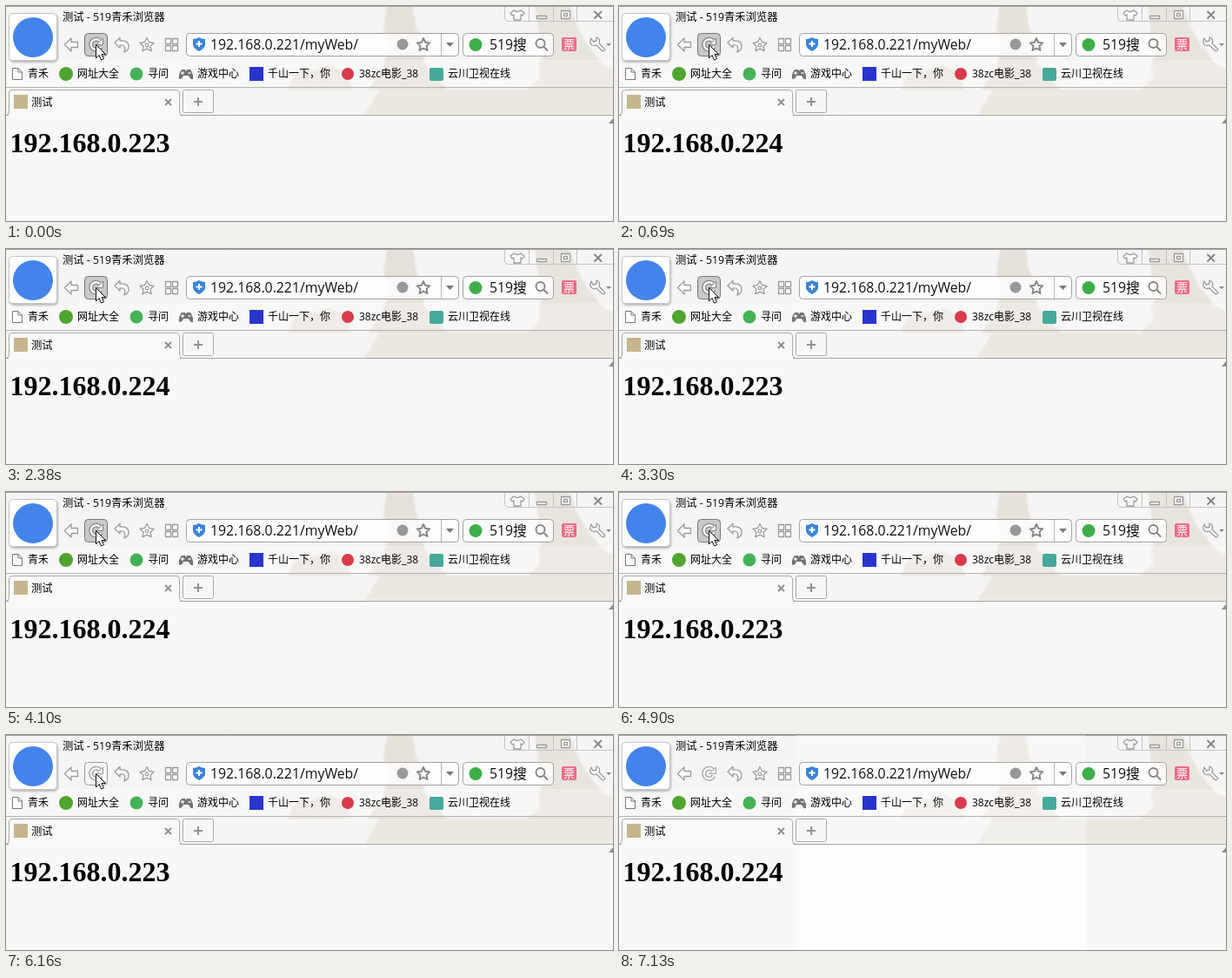
Animation of 698x247 px, one loop 7570 ms. Source, as an HTML page:

```html
<!DOCTYPE html>
<html lang="zh-CN">
<head>
<meta charset="utf-8">
<title>测试</title>
<style>
html, body { margin: 0; width: 100%; height: 100%; overflow: hidden; background: #f8f8f8; }
svg { display: block; width: 698px; height: 247px; }
text { font-family: "Open Sans", "Noto Sans CJK SC", "Noto Sans CJK", sans-serif; white-space: pre; }
.ui { font-size: 12.3px; }
.mark { font-size: 12px; }
.big { font-size: 15.8px; fill: #111; }
#ip { font: bold 32px "Liberation Serif", serif; }
.line { fill: none; stroke: #9b9b9b; stroke-width: 1.3; stroke-linejoin: round; stroke-linecap: round; }
.white { fill: #fcfcfc; }
.bold { stroke: #858585; stroke-width: 1.9; }
.thin { fill: none; stroke: #aaa; }
.box { fill: #fff; fill-opacity: .8; stroke: #a3a3a3; }
</style>
</head>
<body>
<svg viewBox="0 0 698 247">
  <defs>
    <linearGradient id="sky" x2="0" y2="1">
      <stop offset="0" stop-color="#f5f5f5"/>
      <stop offset="1" stop-color="#f6f5f4"/>
    </linearGradient>
    <filter id="soft"><feGaussianBlur stdDeviation="1.2"/></filter>
    <clipPath id="bar"><path d="M0 0H698V125H0z"/></clipPath>
    <clipPath id="query"><path d="M550 32H600V58H550z"/></clipPath>
  </defs>

  <!-- wallpaper -->
  <g clip-path="url(#bar)">
    <path fill="url(#sky)" d="M0 0H698V125H0z"/>
    <g filter="url(#soft)">
      <path fill="#e9e5e0" d="M324 96L330 82 342 72 352 74 372 68 390 76 398 96z"/>
      <path fill="#e6e1db" d="M438 0H468L471 22 479 45 481 66 496 84 508 96H416L432 76 440 50 434 26z"/>
      <path fill="#e8e4de" d="M608 0H648L656 22 668 44 686 66 698 72V96H600L614 82 612 66 621 52 613 34z"/>
      <path fill="#ebe7e1" d="M430 96H698V125H412z"/>
    </g>
    <path fill="#fff" fill-opacity=".25" d="M0 62H698V94H0z"/>
  </g>
  <path stroke="#a0a0a0" d="M0 .5H698"/>
  <path fill="#f8f8f8" d="M0 125H698V247H0z"/>
  <g id="pale" fill="#fff">
    <path fill-opacity=".3" d="M204 0H537V125H204z"/>
    <path fill-opacity=".75" d="M204 126H537V247H204z"/>
  </g>

  <!-- window buttons -->
  <path fill="none" stroke="#c4c4c4" d="M573.500 1V13Q573.500 17.500 578 17.500H698M601.500 1V17M629.500 1V17M656.500 1V17"/>
  <g class="line white">
    <path d="M584 5L580 8 582 11 584 10V16H592V10L594 11 596 8 592 5Q588 8 584 5z"/>
    <path d="M610.500 11.500H621.500V14.500H610.500zM638.500 5.500H648.500V14.500H638.500zM641.500 8.500H645.500V11.500H641.500z"/>
    <path class="bold" d="M677 6.500L684.500 14M684.500 6.500L677 14"/>
  </g>

  <!-- browser badge -->
  <rect x="4" y="10" width="56" height="55" rx="5" fill="#000" fill-opacity=".25" filter="url(#soft)"/>
  <rect x="3.500" y="8.500" width="55" height="54" rx="4" fill="#fff" stroke="#c4c4c4"/>
  <circle cx="31" cy="36" r="23" fill="#4384ea"/>

  <text id="title" class="ui" x="65" y="17"></text>

  <!-- toolbar -->
  <path class="line white" d="M67.500 44.500L75 37V41.500H82.500V47.500H75V52z"/>
  <rect id="button" x="90.500" y="31.500" width="26" height="26" rx="4"/>
  <g id="reload" fill="none">
    <path stroke-width="5" d="M108 40A6 6 0 1 0 109 47"/>
    <path stroke="#fafafa" stroke-width="2.400" d="M108 40A6 6 0 1 0 109 47"/>
    <path fill="#f6f6f6" d="M111.500 37V44.500H104z"/>
  </g>
  <path class="line white" d="M125 42L131 36.500V40Q141 39 141 46.500 141 51 136 53 139 44 131 45V48z"/>
  <path id="star" class="line white" d="M162 36.500L164.500 41.500 170 42.300 166 46.200 167 51.700 162 49.100 157 51.700 158 46.200 154 42.300 159.500 41.500z"/>
  <circle class="line" cx="162" cy="45" r="1.800"/>
  <path class="line white" d="M183.500 37.500H189.500V43.500H183.500zM183.500 45.500H189.500V51.500H183.500zM191.500 45.500H197.500V51.500H191.500zM191.500 37.500H197.500V43.500H191.500z"/>

  <rect class="box" x="207.500" y="31.500" width="313" height="26" rx="4"/>
  <path fill="#3b84da" d="M215 38Q219 38 222 36 225 38 229 38V45Q228 49 222 52 216 49 215 45z"/>
  <path stroke="#fff" stroke-width="2" d="M218.500 43.500H225.500M222 40V47"/>
  <text class="big" x="235" y="50">192.168.0.221/myWeb/</text>
  <circle cx="456" cy="44" r="6.500" fill="#999"/>
  <path class="line bold" d="M480 37L482.200 41.800 487.300 42.400 483.500 45.900 484.500 51 480 48.500 475.500 51 476.500 45.900 472.700 42.400 477.800 41.800z"/>
  <path stroke="#b5b5b5" d="M500.500 32V57"/>
  <path fill="#777" d="M506 42H515L510.500 47z"/>

  <rect class="box" x="525.500" y="31.500" width="104" height="26" rx="4"/>
  <circle cx="540" cy="44.500" r="7.500" fill="#3fae49"/>
  <text class="big" x="556" y="50" clip-path="url(#query)">519搜索</text>
  <path class="line bold" d="M619.500 43A5 5 0 1 1 609.500 43A5 5 0 1 1 619.500 43M618.500 47L622.500 51"/>
  <rect x="639" y="36" width="17" height="16" rx="2" fill="#ef6b86"/>
  <text x="641" y="49" font-size="13" fill="#fff">票</text>
  <path class="line white" d="M673 37Q670 42 674 45 677 46 679 45L685 51Q687 53 689 50L682 43Q684 38 679 36L679 40 675 41z"/>
  <path fill="#888" d="M690 43H696L693 46z"/>

  <!-- bookmarks -->
  <path fill="#fff" stroke="#777" d="M7.500 71.500H14L18.500 76V84.500H7.500zM14 71.500V76H18.500"/>
  <circle cx="69" cy="78" r="8" fill="#4fa52f"/>
  <circle cx="150" cy="78" r="7.500" fill="#45b257"/>
  <path fill="#737373" d="M202 73H206L207 75 208 73H212Q216 79 215 84 212 85 210 80H204Q202 85 199 83.500 198 78 202 73z"/>
  <path stroke="#eee" stroke-width="1.400" d="M201 77H205M203 75V79M209.500 77H212.500"/>
  <path fill="#2934cf" d="M280 70H296V86H280z"/>
  <circle cx="393" cy="78" r="7" fill="#d83b4b"/>
  <rect x="487" y="71" width="16" height="15" rx="2" fill="#45a99b"/>
  <g class="mark">
    <text x="25" y="82">青禾</text>
    <text x="82" y="82">网址大全</text>
    <text x="163" y="82">寻问</text>
    <text x="220" y="82">游戏中心</text>
    <text x="301" y="82">千山一下，你</text>
    <text x="406" y="82">38zc电影_38</text>
    <text x="508" y="82">云川卫视在线</text>
  </g>

  <!-- tabs -->
  <path stroke="#b4b4b4" d="M0 93.500H698"/>
  <path stroke="#a4a4a4" d="M0 125.500H698"/>
  <path fill="#f9f9f9" d="M3 97H200V126H3z"/>
  <path class="thin" d="M0 125.500Q3.500 125 3.500 121V100Q3.500 96.500 7 96.500H196Q199.500 96.500 199.500 100V121Q199.500 125 203 125.500"/>
  <rect x="203.500" y="96.500" width="35" height="26" rx="2" fill="#f7f7f7" stroke="#aaa"/>
  <path stroke="#929292" stroke-width="2" d="M216 110H226M221 105V115"/>
  <path stroke="#8b8b8b" stroke-width="1.800" d="M183 107L190 114M190 107L183 114"/>
  <path fill="#c6b68d" d="M9 102H25V118H9z"/>
  <text id="tab" class="ui" x="29" y="115"></text>

  <!-- page -->
  <text id="ip" x="4.600" y="168"></text>
  <path fill="#8d8d8d" d="M693 135L698 129V135z"/>

  <path id="cursor" fill="#fff" stroke="#111" d="M103.500 44.500V60L107 56.500 109.500 62 112.500 60.700 110 55.500H114.500z"/>
</svg>
<script>
const LOOP = 7570;
const URL_TEXT = '192.168.0.221/myWeb/';
const looks = {
  press: ['#c9c9c9', '#777', '#858585'],
  hover: ['#f4f4f4', '#999', '#999'],
  idle: ['none', 'none', '#a3a3a3']
};
// Every "load" brings the answer of the other server.
const steps = [
  [0, 'press'], [120, 'load'], [260, 'ready'],
  [690, 'press'], [820, 'load'], [960, 'ready'],
  [1650, 'wait'], [1800, 'load'], [1920, 'ready'],
  [2380, 'press'], [2500, 'load'], [2620, 'ready'],
  [3300, 'press'], [3430, 'load'], [3570, 'ready'],
  [4100, 'press'], [4250, 'load'], [4380, 'ready'],
  [4900, 'press'], [5020, 'load'], [5300, 'ready'],
  [5760, 'press'], [5880, 'load'], [6160, 'ready'],
  [6590, 'press'], [6720, 'load'], [6870, 'ready'],
  [6990, 'idle']
];
const $ = id => document.getElementById(id);
const show = (id, on) => $(id).setAttribute('visibility', on ? 'visible' : 'hidden');

function draw(time) {
  const past = steps.filter(([start]) => start <= time);
  const state = past[past.length - 1][1];
  const loads = past.filter(([, name]) => name === 'load').length;
  const name = state === 'load' || state === 'wait' ? URL_TEXT : '测试';
  const [fill, border, ink] = looks[state] || looks.hover;

  $('title').textContent = name + ' - 519青禾浏览器';
  $('tab').textContent = name;
  $('ip').textContent = '192.168.0.' + (223 + loads % 2);
  $('button').setAttribute('fill', fill);
  $('button').setAttribute('stroke', border);
  $('reload').setAttribute('stroke', ink);
  show('cursor', state !== 'idle');
  show('pale', state === 'idle');
}

const begin = performance.now();
function tick() {
  draw((performance.now() - begin) % LOOP);
  requestAnimationFrame(tick);
}
tick();
</script>
</body>
</html>
```
